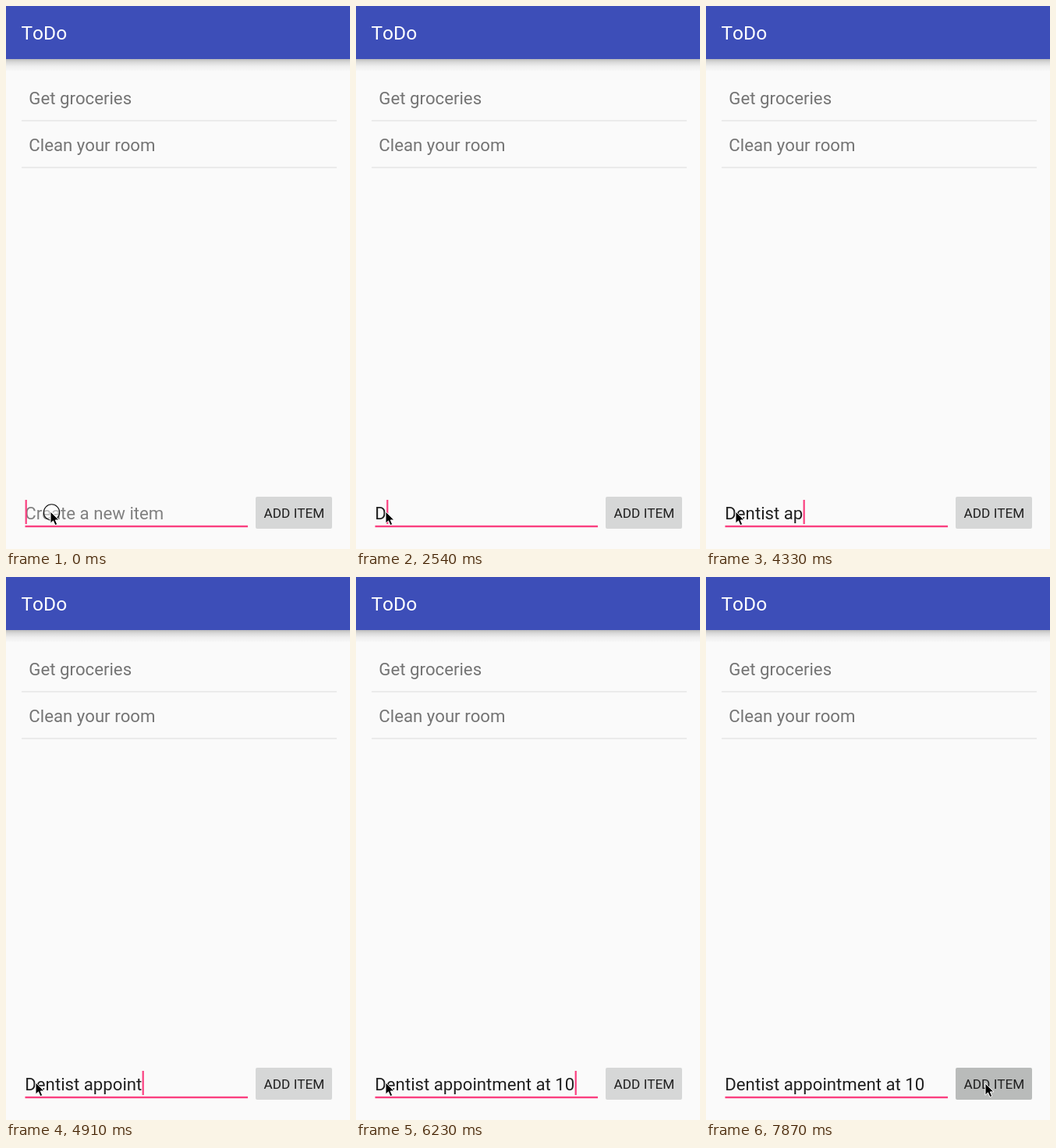
Recreate the animation shown at these times as an HTML page. Size 441 px wide and 696 px high, loop 8 s.

```html
<!DOCTYPE html>
<html lang="en">
<head>
<meta charset="utf-8">
<title>ToDo</title>
<style>
  html, body { margin: 0; width: 100%; height: 100%; overflow: hidden; background: #fafafa; }
  svg { display: block; width: 100%; height: 100%; }
  text { font: 22.2px Roboto, sans-serif; font-kerning: none; white-space: pre; }
  .title { font-size: 24.5px; fill: #fff; }
  .item { fill: #747474; }
  .hint { fill: #808080; }
  .typed { fill: #202020; }
  .label { font-size: 17.2px; fill: #202020; }
  .divider { fill: #e2e2e2; }
  .accent { fill: #fa4080; }
</style>
</head>
<body>
<svg viewBox="0 0 441 696">
  <defs>
    <linearGradient id="shade" x2="0" y2="1">
      <stop offset="0" stop-color="#b4b4b4"/>
      <stop offset=".3" stop-color="#d8d8d8"/>
      <stop offset=".65" stop-color="#efefef"/>
      <stop offset="1" stop-color="#f7f7f7"/>
    </linearGradient>
  </defs>
  <rect width="441" height="696" fill="#fafafa"/>
  <rect y="67" width="441" height="16" fill="url(#shade)"/>
  <rect width="441" height="68" fill="#3d4eb8"/>
  <text class="title" x="19.5" y="43">ToDo</text>

  <text class="item" x="29.3" y="126">Get groceries</text>
  <rect class="divider" x="20" y="146.4" width="404" height="1.2"/>
  <text class="item" x="29.3" y="186">Clean your room</text>
  <rect class="divider" x="20" y="206.4" width="404" height="1.2"/>

  <text class="hint" id="hint" x="24.3" y="658">Create a new item</text>
  <text class="typed" id="typed" x="24.3" y="658"></text>
  <rect class="accent" x="24.5" y="665.8" width="285.5" height="2.4"/>
  <rect class="accent" id="caret" y="633" width="2.2" height="31"/>

  <rect id="button" x="320" y="629" width="98" height="41" rx="2"/>
  <text class="label" x="330.6" y="656">ADD ITEM</text>

  <g id="pointer">
    <circle id="ring" cx="1.5" cy="1" r="10.2" fill="#fff" fill-opacity=".45" stroke="#111" stroke-width="1.1"/>
    <path d="M0 0V15.2L3.5 11.9 6 17.6 8.7 16.4 6.3 10.9H11Z" fill="#000" stroke="#fff"/>
  </g>
</svg>
<script>
  const LOOP = 8000;
  const STEPS = 54;
  const MESSAGE = 'Dentist appointment at 10';
  const FIRST_KEY = 17, LAST_KEY = 42, PRESS = 53;
  const $ = id => document.getElementById(id);
  const show = (el, on) => el.setAttribute('visibility', on ? 'visible' : 'hidden');

  // Progress from 0 to 1 between two steps.
  const ramp = (step, from, to) => Math.min(1, Math.max(0, (step - from) / (to - from)));

  // Typing runs in three bursts with a short pause before each word.
  const typedCount = step => step < FIRST_KEY ? 0 : Math.floor(
    1 + ramp(step, 17, 19) + 5 * ramp(step, 19, 23) + ramp(step, 23, 25) +
    ramp(step, 25, 28) + 9 * ramp(step, 28, 35) + 7 * ramp(step, 35, LAST_KEY));

  // The caret stays lit while typing and blinks when idle.
  function caretLit(step) {
    if (step >= FIRST_KEY && step < LAST_KEY) return true;
    const idle = step < FIRST_KEY ? step : step - LAST_KEY;
    return Math.floor((idle + 0.5) / 3.25) % 2 === 0;
  }

  function pointerAt(step) {
    const rest = ramp(step, 1, 3), cross = ramp(step, 44, 47), settle = ramp(step, 47, 50);
    return [57 - 19 * rest + 287 * cross + 33 * settle, 648 - 15 * cross + 16 * settle];
  }

  function draw(t) {
    const step = Math.floor(t / LOOP * STEPS);
    const count = typedCount(step);

    $('typed').textContent = MESSAGE.slice(0, count);
    show($('hint'), count === 0);
    $('caret').setAttribute('x', 24.6 + (count && $('typed').getComputedTextLength()));
    show($('caret'), caretLit(step));

    $('pointer').setAttribute('transform', `translate(${pointerAt(step)})`);
    show($('ring'), step === 0);
    $('button').setAttribute('fill', step < PRESS ? '#d6d7d7' : '#b9bbba');
  }

  const begin = performance.now();
  function tick() {
    draw((performance.now() - begin) % LOOP);
    requestAnimationFrame(tick);
  }
  tick();
</script>
</body>
</html>
```
